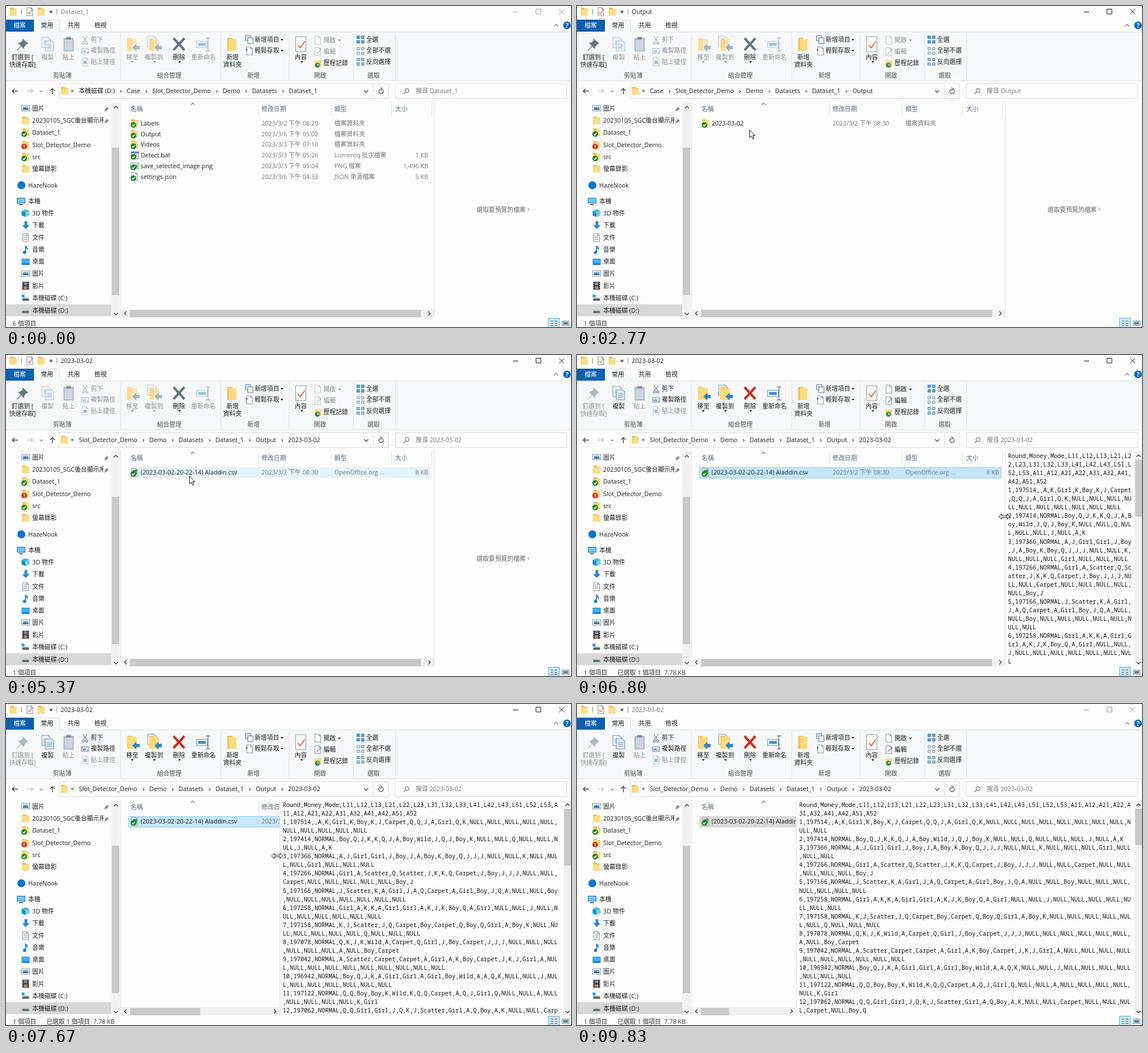
These frames come from a looping animation (993x564 px, 9910 ms). An HTML page with a canvas:

```html
<!DOCTYPE html>
<html lang="zh-Hant">
<head>
<meta charset="utf-8">
<style>
html, body { margin: 0; width: 100%; height: 100%; overflow: hidden; background: #fdfdfd; }
canvas { display: block; }
</style>
</head>
<body>
<canvas id="stage" width="993" height="564"></canvas>
<script>
const W = 993, H = 564, LOOP = 9910;
const options = { alpha: false, willReadFrequently: true };
const stage = document.getElementById('stage').getContext('2d', options);
let ctx = stage;
const UI = "10.8px 'Open Sans','Noto Sans CJK TC','Noto Sans CJK JP',sans-serif";
const MONO = "10.33px 'Noto Sans Mono','Liberation Mono',monospace";
const INK = '#1c1c1c', DIM = '#757575', FAINT = '#9b9b9b', THUMB = '#c9c9c9', TRACK = '#f1f1f1', RULE = '#e2e2e2';

// Motion: [time, ...values], linear between keys
const cursorKeys = [
  [500, 566, 566], [730, 456, 389], [1030, 456, 389], [1570, 297, 224], [2670, 297, 224],
  [2930, 314, 208], [3830, 314, 208], [3900, 314, 213], [4280, 314, 213], [4300, 324, 213],
  [4500, 324, 213], [4700, 322.5, 213], [5550, 322.5, 213], [6130, 743, 277], [6370, 743, 277],
  [6400, 746, 279], [6700, 746, 279], [6730, 751, 284], [7200, 752, 284], [7470, 564, 279],
  [7870, 390, 255], [8170, 385, 255], [8330, 385, 255], [8650, 302, 300], [9200, 736, 568]
];
const dividerKeys = [[7200, 752], [7470, 571.5], [7870, 391], [8170, 385]];

function track(keys, t) {
  if (t <= keys[0][0]) return keys[0].slice(1);
  for (let i = 1; i < keys.length; i++) {
    const a = keys[i - 1], b = keys[i];
    if (t < b[0]) return a.slice(1).map((v, j) => v + (b[j + 1] - v) * (t - a[0]) / (b[0] - a[0]));
  }
  return keys.at(-1).slice(1);
}

// Folder contents: [icon, name, date, type, size]
const DIR = '檔案資料夾';
const views = {
  dataset: {
    title: 'Dataset_1',
    path: ['本機磁碟 (D:)', 'Case', 'Slot_Detector_Demo', 'Demo', 'Datasets', 'Dataset_1'],
    rows: [
      ['folder', 'Labels', '2023/3/2 下午 08:20', DIR, ''],
      ['folder', 'Output', '2023/3/6 下午 05:02', DIR, ''],
      ['folder', 'Videos', '2023/3/3 下午 07:10', DIR, ''],
      ['batch', 'Detect.bat', '2023/3/3 下午 05:26', 'Lumeroq 批次檔案', '1 KB'],
      ['picture', 'save_selected_image.png', '2023/3/3 下午 05:04', 'PNG 檔案', '1,496 KB'],
      ['page', 'settings.json', '2023/3/6 下午 04:33', 'JSON 來源檔案', '5 KB']
    ]
  },
  output: {
    title: 'Output',
    path: ['Case', 'Slot_Detector_Demo', 'Demo', 'Datasets', 'Dataset_1', 'Output'],
    rows: [['folder', '2023-03-02', '2023/3/2 下午 08:30', DIR, '']]
  },
  day: {
    title: '2023-03-02',
    path: ['Slot_Detector_Demo', 'Demo', 'Datasets', 'Dataset_1', 'Output', '2023-03-02'],
    rows: [['sheet', '(2023-03-02-20-22-14) Aladdin.csv', '2023/3/2 下午 08:30', 'OpenOffice.org ...', '8 KB']]
  }
};

// Spreadsheet preview: one letter per cell
const words = { G: 'Girl', B: 'Boy', C: 'Carpet', S: 'Scatter', W: 'Wild', '.': 'NULL' };
const spins = `197514 AKGKBKJCQQJAGQK..........
197414 BQJKKQJABWJQJBK..Q...J.AK
197366 AJGGJBJABKBQJJJ..K...G...
197266 GASQSJKKQCJBJJJ..C.....BJ
197166 JSKAGJAQCAGBJQA..B.......
197258 GAKKAGGAKJKBQAG..J.......
197158 KJSJQCBCQBQGABK......Q...
197078 QKJKWACQGJBCJJJ......A.BC
197042 ASCCAGAKBCJKJGA..........
196942 BQJKAGGAGBWAAQK..J.......
197122 QQBBKWKQQCAQJGQ..A.....KG
197062 QQGGJQKJSGAQBAK..C...C.BQ`;
const grid = (letter, n) => [1, 2, 3, 4, 5].flatMap(i => [1, 2, 3].slice(0, n).map(j => letter + i + j));
const csv = [['Round', 'Money', 'Mode', ...grid('L', 3), ...grid('A', 2)].join()].concat(
  spins.split('\n').map((line, i) => {
    const [money, cells] = line.split(' ');
    return [i + 1, money, i ? 'NORMAL' : '', ...[...cells].map(c => words[c] || c)].join();
  }));

// Icons: colour and path pairs around the centre; "~" strokes
const sheetOutline = ['#fff', 'M-5-7H2L5-4V7H-5z', '~#8b9299', 'M-5-7H2L5-4V7H-5zM2-7V-4H5'];
const bigSheet = (x, y, c) => [c, `M${x} ${y}h11l4 4v14h-15z`, '~#7f95ab', `M${x} ${y}h11l4 4v14h-15zM${x + 3} ${y + 7}h9m-9 3h9m-9 3h9`];
const bigFolder = ['#f2c45a', 'M-9-11H-1V11H-9z', '#ffd978', 'M-8-9H8V12H-8z'];
const blueArrow = ['#2f86c8', 'M0 6L7-1V3H13V9H7V13z'];
const tiles = c => [c, 'M-7-7h6v6h-6zM1-7h6v6h-6zM-7 1h6v6h-6zM1 1h6v6h-6z', '~#4d83ad', 'M-6-6h4v4h-4zM2-6h4v4h-4zM-6 2h4v4h-4zM2 2h4v4h-4z'];
const icons = {
  folder: ['#efc04f', 'M-6-7H0L1-5H6V7H-6z', '#ffdd83', 'M-5-4H6V7H-5z'],
  page: sheetOutline,
  checkPage: [...sheetOutline, '~#d5502c', 'M-3 1L-1 4L4-3'],
  editPage: [...sheetOutline, '~#3f78a8', 'M-2 4L6-4'],
  history: ['#ffd978', 'M-6-5H6V6H-6z', '#3b8f4c', 'M-5 3a4.5 4.5 0 1 0 9 0a4.5 4.5 0 1 0-9 0', '~#fff', 'M0 0V3H3'],
  batch: ['#fff', 'M-6-6H7V6H-6z', '~#75828f', 'M-6-6H7V6H-6z', '#5287b5', 'M-6-6H7V-3H-6z', '#9aa4ad', 'M0-1h4v4h-4z'],
  picture: ['#fff', 'M-7-5H7V5H-7z', '~#8a98a5', 'M-7-5H7V5H-7z', '#79b8e4', 'M-5-3H5V3H-5z', '#436f82', 'M-5 3V1L-1-1L2 1L5 0V3z'],
  sheet: [...sheetOutline, '#2f9d3f', 'M-3-4H4V4H-3z'],
  circle: ['#0a74d1', 'M-7 0a7 7 0 1 0 14 0a7 7 0 1 0-14 0'],
  computer: ['#3d6f95', 'M-8-6H7V4H-8z', '#6cc6f2', 'M-7-5H6V3H-7z', '#54718a', 'M-4 5H3V7H-4z'],
  cube: ['#40bcd8', 'M-7-4L0-7L7-4L0-1z', '#1f8fb5', 'M-7-4L0-1V7L-7 4z', '#78d6e6', 'M0-1L7-4V4L0 7z'],
  download: ['#2f86d2', 'M-2-7H3V0H7L0 7L-6 0H-2z'],
  text: [...sheetOutline, '~#4c86b4', 'M-3-3H2M-3 0H3M-3 3H3'],
  music: ['#1b83d6', 'M-1-7H1C2-4 6-3 4 2C4-1 3-1 1-2V4A3 3 0 1 1-1 2z'],
  desktop: ['#1683d8', 'M-7-5H7V6H-7z', '#43b0f1', 'M-6-4H6V3H-6z'],
  film: ['#34373c', 'M-6-7H6V7H-6z', '#7a8fc0', 'M-3-6H3V-1H-3z', '#c38a62', 'M-3 1H3V6H-3z', '~#e8e8e8', 'M-5-5v1m0 3v1m0 3v1M5-5v1m0 3v1m0 3v1'],
  disk: ['#5f666c', 'M-6 1H6V5H-6z', '#c5cace', 'M-6 1L-4-1H4L6 1z', '#41b84d', 'M3 2h2v2h-2z'],
  systemDisk: ['#5f666c', 'M-6 1H6V5H-6z', '#c5cace', 'M-6 1L-4-1H4L6 1z', '#21a2e4', 'M-7-6h5v5h-5z'],
  pin: ['#697680', 'M0-10L10-1L6 1L3 5L3 9L-8-2L-4-3L0-6z', '~#697680', 'M-3 4L-10 11'],
  smallPin: ['#7b858d', 'M0-4L4 0L1 1L0 4L-4 0L-1-1z', '~#7b858d', 'M-1 1L-4 4'],
  copy: [...bigSheet(-10, -12, '#eaf4fc'), ...bigSheet(-4, -6, '#d8ebf9')],
  paste: ['#6d7f93', 'M-9-11H9V13H-9z', '#eaf2f9', 'M-7-8H7V11H-7z', '#49596a', 'M-4-13H4V-8H-4z'],
  cut: ['~#5b7087', 'M-4-7L3 3M4-7L-3 3M-5 5a2 2 0 1 0 4 0a2 2 0 1 0-4 0M1 5a2 2 0 1 0 4 0a2 2 0 1 0-4 0'],
  route: ['#eef4fa', 'M-6-4H6V4H-6z', '~#587da0', 'M-6-4H6V4H-6zM-4-1L-3 2L-1-1L0 2L2-1M3 2H5'],
  shortcut: [...sheetOutline, '#3f83bd', 'M-3-2H3V4H-3z'],
  move: [...bigFolder, ...blueArrow],
  copyTo: [...bigSheet(-12, -14, '#eef5fb'), ...bigFolder, ...blueArrow],
  cross: ['#d5291f', 'M-11-9L-8-12L0-3L8-12L11-9L3 0L11 9L8 12L0 3L-8 12L-11 9L-3 0z'],
  rename: ['#eaf4fc', 'M-12-5H7V6H-12z', '~#6d8fac', 'M-12-5H7V6H-12z', '#3f8fcd', 'M-9-2H4V3H-9z', '~#44576b', 'M4-11H12M8-11V12M4 12H12'],
  newFolder: ['#f0c055', 'M-8-11H1V12H-8z', '#ffdb7d', 'M-5-9H8V12H-5z'],
  newItem: ['#dcebf7', 'M-7-7H2V2H-7z', '~#557f9e', 'M-7-7H2V2H-7zM-3-3H6V7H-3z', '#fff', 'M-2-2H5V6H-2z'],
  easy: [...sheetOutline, '~#3474a5', 'M-7-2H-3M-5-4V0'],
  properties: ['#fff', 'M-9-13H9V13H-9z', '~#8a949c', 'M-9-13H9V13H-9z', '~#de5427', 'M-5 1L-1 6L7-5M-5 2L-1 7L7-4'],
  all: tiles('#59aee6'), none: tiles('#fff'), invert: tiles('#b7ddf5')
};
icons.greyCross = ['#66727d', icons.cross[1]];

function stroke(d, color, width = 1) {
  ctx.strokeStyle = color;
  ctx.lineWidth = width;
  ctx.stroke(new Path2D(d));
}
function rect(x, y, w, h, fill, border) {
  ctx.fillStyle = fill;
  ctx.fillRect(x, y, w, h);
  if (border) {
    ctx.strokeStyle = border;
    ctx.lineWidth = 1;
    ctx.strokeRect(x + .5, y + .5, w - 1, h - 1);
  }
}
function text(s, x, y, color = INK, align = 'left', font = UI) {
  ctx.font = font;
  ctx.fillStyle = color;
  ctx.textAlign = align;
  ctx.fillText(s, x, y + 4);
}
function icon(name, x, y, alpha = 1) {
  const parts = icons[name];
  ctx.save();
  ctx.translate(x, y);
  ctx.globalAlpha = alpha;
  for (let i = 0; i < parts.length; i += 2) {
    if (parts[i][0] === '~') stroke(parts[i + 1], parts[i].slice(1), 1.1);
    else {
      ctx.fillStyle = parts[i];
      ctx.fill(new Path2D(parts[i + 1]));
    }
  }
  ctx.restore();
}
function disc(x, y, r, color) {
  ctx.fillStyle = color;
  ctx.beginPath();
  ctx.arc(x, y, r, 0, 7);
  ctx.fill();
}
function badge(x, y, ok) {
  disc(x, y, 5, ok ? '#17861f' : '#cf3517');
  stroke(ok ? `M${x - 2.5} ${y}l2 2l3-4` : `M${x} ${y - 3}v4m0 1v1.3`, '#fff', 1.5);
}
const turns = { up: [-4, 2, 0, -2, 4, 2], down: [-4, -2, 0, 2, 4, -2], left: [2, -4, -2, 0, 2, 4], right: [-2, -4, 2, 0, -2, 4] };
function chevron(dir, x, y, color = '#444', width = 1.4, size = .9) {
  const p = turns[dir].map((v, i) => v * size + (i % 2 ? y : x));
  stroke(`M${p[0]} ${p[1]}L${p[2]} ${p[3]}L${p[4]} ${p[5]}`, color, width);
}
function menuMark(x, y, color = '#333') {
  ctx.fillStyle = color;
  ctx.fill(new Path2D(`M${x - 2.5} ${y - 1}h5l-2.5 3z`));
}
function clipped(x, y, w, h, draw) {
  ctx.save();
  ctx.beginPath();
  ctx.rect(x, y, w, h);
  ctx.clip();
  draw();
  ctx.restore();
}

function titleBar(title, focused) {
  const ink = focused ? '#111' : FAINT;
  icon('folder', 13, 10);
  icon('checkPage', 42, 10);
  icon('folder', 62, 10);
  stroke('M27.5 5V15M89.5 5V15', '#888');
  stroke('M76 9H82', '#333');
  menuMark(79, 11);
  text(title, 96, 10, focused ? INK : DIM);
  stroke('M891 10.5H900M931.5 5.5H940V14H931.5zM972 5.5L981 14.5M981 5.5L972 14.5', ink);
}

// [icon, x, y, label, label x, label y, enabled when, menu x, menu y]
const buttons = [
  ['pin', 29, 67, '釘選到 [', 29, 90, 'idle'], ['', 0, 0, '快速存取]', 29, 103, 'idle'],
  ['copy', 73, 67, '複製', 73, 90, 'picked'], ['paste', 110, 67, '貼上', 110, 90, 'never'],
  ['cut', 139, 60, '剪下', 149, 59, 'picked'], ['route', 139, 79, '複製路徑', 149, 78, 'picked'],
  ['shortcut', 139, 98, '貼上捷徑', 149, 98, 'never'],
  ['move', 222, 67, '移至', 222, 90, 'picked', 222, 98], ['copyTo', 261, 67, '複製到', 260, 90, 'picked', 261, 98],
  ['cross', 304, 67, '刪除', 304, 90, '', 305, 98], ['rename', 347, 67, '重新命名', 347, 90, 'picked'],
  ['newFolder', 397, 67, '新增', 398, 90, ''], ['', 0, 0, '資料夾', 398, 103, ''],
  ['newItem', 428, 59, '新增項目', 437, 59, '', 485, 59], ['easy', 428, 79, '輕鬆存取', 437, 78, '', 485, 78],
  ['properties', 518, 67, '內容', 518, 90, '', 520, 98],
  ['page', 548, 60, '開啟', 558, 60, 'picked', 586, 60], ['editPage', 548, 80, '編輯', 558, 80, 'picked'],
  ['history', 548, 101, '歷程記錄', 558, 100, ''],
  ['all', 623, 59, '全選', 633, 59, ''], ['none', 623, 79, '全部不選', 633, 78, ''], ['invert', 623, 98, '反向選擇', 633, 98, '']
];
function ribbon(picked) {
  rect(0, 46, W, 86, '#f7f8f9');
  stroke('M0 45.5H49.5V24.5H94.5V45.5H993M0 131.5H993', '#dfe1e3');
  rect(50, 25, 44, 22, '#f7f8f9');
  rect(0, 24, 49, 21, '#0a60b2');
  [['檔案', 24, '#fff'], ['常用', 72], ['共用', 119], ['檢視', 166]].forEach(([s, x, c]) => text(s, x, 34, c, 'center'));
  chevron('up', 967, 34, '#777', 1.2);
  disc(986, 34, 6.8, '#0a68bd');
  text('?', 986, 34, '#fff', 'center', 'bold ' + UI);
  stroke('M201.5 48V130M377.5 48V130M497.5 48V130M610.5 48V130M684.5 48V130', RULE);
  for (const [name, x, y, label, lx, ly, when, mx, my] of buttons) {
    const on = !when || when === (picked ? 'picked' : 'idle');
    const color = on ? INK : '#8a8f94';
    if (name) icon(name === 'cross' && !picked ? 'greyCross' : name, x, y, on ? 1 : .5);
    text(label, lx, ly, color, !name || y === 67 ? 'center' : 'left');
    if (mx) menuMark(mx, my, color);
  }
  [['剪貼簿', 99], ['組合管理', 287], ['新增', 435], ['開啟', 552], ['選取', 646]].forEach(([s, x]) => text(s, x, 122, '#4c4c4c', 'center'));
}

function addressBar({ title, path }) {
  stroke('M21 149.5H11M15 145.5L11 149.5L15 153.5M81.5 155V145M77.5 149L81.5 145L85.5 149', '#444', 1.4);
  stroke('M37 149.5H47M43 145.5L47 149.5L43 153.5', '#c9c9c9', 1.3);
  chevron('down', 62, 150, '#777', 1.2, .6);
  rect(93, 136, 580, 27, '#fdfdfd', '#dcdcdc');
  stroke('M645.5 137V162', '#dcdcdc');
  icon('folder', 103, 149);
  text('«', 114, 148);
  let x = 128;
  path.forEach((part, i) => {
    text(part, x, 149);
    x += ctx.measureText(part).width + 21;
    if (i < path.length - 1) chevron('right', x - 10.5, 150, '#555', 1.2, .6);
  });
  chevron('down', 633, 150, '#444', 1.4);
  stroke('M662.5 147.5A4 4 0 1 1 658 146M658 143.5L661.5 146L658 148.5', '#444', 1.2);
  rect(684, 136, 302, 27, '#fdfdfd', '#dcdcdc');
  stroke('M701.5 148.5a3.3 3.3 0 1 1 6.6 0a3.3 3.3 0 1 1-6.6 0M702.5 151L698.5 154.5', '#777', 1.2);
  text('搜尋 ' + title, 720, 149, DIM);
}

const places = [
  ['picture', '圖片', 179.5], ['folder', '20230105_SGC後台顯示用', 201], ['folder', 'Dataset_1', 222, true],
  ['folder', 'Slot_Detector_Demo', 244, false], ['folder', 'src', 265, true], ['folder', '螢幕錄影', 286],
  ['circle', 'HazeNook', 315], ['computer', '本機', 343], ['cube', '3D 物件', 364], ['download', '下載', 385],
  ['text', '文件', 407], ['music', '音樂', 428], ['desktop', '桌面', 449], ['picture', '圖片', 470],
  ['film', '影片', 491.5], ['systemDisk', '本機磁碟 (C:)', 513], ['disk', '本機磁碟 (D:)', 534.5]
];
function sidebar() {
  rect(0, 524, 185, 21, '#d8d8d8');
  clipped(0, 168, 171.5, 379, () => places.forEach(([name, label, y, mark]) => {
    const root = name === 'circle' || name === 'computer';
    icon(name, root ? 27 : 34.5, y);
    if (mark !== undefined) badge(32, y + 3, mark);
    text(label, root ? 39 : 46, y);
  }));
  icon('smallPin', 177, 181);
  icon('smallPin', 177, 202);
  rect(185, 170, 15, 377, TRACK);
  rect(186, 249, 13, 259, THUMB);
  chevron('up', 193, 178);
  chevron('down', 193, 541);
  stroke('M201.5 168V547', RULE);
}

function fileList(rows, right, picked, hovered, focused) {
  clipped(203, 166, right - 203, 382, () => {
    stroke('M443.5 169V193M571.5 169V193M677.5 169V193M748.5 169V193', RULE);
    chevron('up', 328, 172, '#666', 1.1, .8);
    [['名稱', 219], ['修改日期', 449], ['類型', 577], ['大小', 684]].forEach(([s, x]) => text(s, x, 181, '#56677c'));
    rows.forEach(([name, label, date, type, size], i) => {
      const y = 206 + i * 18.7, top = Math.round(y - 9.5);
      if (i === picked) rect(215, top, 531, 20, focused ? '#c6e5fa' : '#d9d9d9', focused && '#99cff2');
      else if (i === hovered) rect(215, top, 531, 19, '#e5f3fd');
      icon(name, 226, y);
      badge(224, y + 3, true);
      text(label, 236.5, y);
      text(date, 449, y, DIM);
      text(type, 577, y, DIM);
      text(size, 742, y, DIM, 'right');
    });
    rect(203, 533, right - 203, 14, TRACK);
    rect(218, 534, (right - 234) * (right - 203) / 556, 13, THUMB);
    chevron('left', 210, 540);
    chevron('right', right - 8, 540);
  });
  stroke(`M${Math.round(right) + .5} 168V547`, RULE);
}

function preview(left, torn, settled) {
  const x = left + 5.6, cols = Math.floor((976 - x) / 6.2);
  clipped(left + 1, 166, W - 1 - left, 380, () => {
    let y = 177;
    csv.forEach((line, row) => {
      for (let i = 0; i < line.length && y < 556; i += cols, y += 15.05) {
        if (!(torn && row === 1 && !i)) text(line.slice(i, i + cols), x, y, '#111', 'left', MONO);
      }
    });
  });
  rect(980, 170, 13, 377, TRACK);
  rect(981, 184, 12, settled ? 64 : 100, THUMB);
  chevron('up', 987, 177);
  chevron('down', 987, 541);
}

function statusBar(count, picked, size) {
  text(count + ' 個項目', 12, 558, '#333');
  if (picked) text('已選取 1 個項目  ' + size, 71, 558, '#333');
  rect(953, 548, 20, 18, '#cde8f8', '#52aede');
  stroke('M957 553.5H962M964 553.5H969M957 557.5H962M964 557.5H969M957 561.5H962M964 561.5H969', '#55636e');
  rect(977, 553, 13, 9, '#fff', '#7d858c');
  rect(979, 555, 9, 5, '#5d88a8');
}

const arrow = 'M0 0V13.5L3.2 10.6L5.4 15.8L7.6 14.9L5.4 9.8H9.6z';
const resizeArrow = 'M-10 0L-5-4.5V-1.5H5V-4.5L10 0L5 4.5V1.5H-5V4.5z';
function pointer(x, y, shape) {
  ctx.save();
  ctx.translate(x, y);
  ctx.fillStyle = '#fff';
  ctx.fill(new Path2D(shape));
  stroke(shape, '#111');
  ctx.restore();
}

// A layer repaints only when its key changes
function makeLayer() {
  const canvas = Object.assign(document.createElement('canvas'), { width: W, height: H });
  const own = canvas.getContext('2d', options);
  let last;
  return (key, paint) => {
    if (key !== last) {
      last = key;
      const outer = ctx;
      ctx = own;
      paint();
      ctx = outer;
    }
    return canvas;
  };
}
const chrome = makeLayer(), scene = makeLayer();
let shown;

function draw(t) {
  const viewName = t < 2100 ? 'dataset' : t < 3230 ? 'output' : 'day', view = views[viewName];
  const [x, y] = track(cursorKeys, t);
  const [divider] = track(dividerKeys, t);
  const fileOpen = t >= 5430, loaded = t >= 5700, settled = t >= 8170;
  const picked = t >= 1930 && t < 2100 ? 1 : t >= 3100 && t < 3230 || fileOpen ? 0 : -1;
  const active = fileOpen || t >= 1980 && t < 2100 || t >= 3140 && t < 3230;
  const focused = t >= 1930 && t < 9800 && !(t >= 4930 && t < 5170);
  const row = x > 215 && x < 746 ? Math.floor((y - 196.5) / 18.7) : -1;
  const hovered = t >= 500 && row < view.rows.length ? row : -1;
  const torn = t >= 7840 && t < 7900;
  const visible = t >= 500 && t < 9200, resizing = t >= 6730 && t < 8400;

  const chromeKey = [viewName, active, focused, fileOpen].join();
  const sceneKey = [chromeKey, divider, picked, hovered, loaded, torn, settled].join();
  const stageKey = [sceneKey, visible && [x, y, resizing]].join();
  if (stageKey === shown) return;
  shown = stageKey;

  stage.drawImage(scene(sceneKey, () => {
    ctx.drawImage(chrome(chromeKey, () => {
      rect(0, 0, W, H, '#fdfdfd');
      titleBar(view.title, focused);
      ribbon(active);
      addressBar(view);
      sidebar();
      statusBar(view.rows.length, active, fileOpen ? '7.78 KB' : '');
    }), 0, 0);
    fileList(view.rows, divider, picked, hovered, focused);
    if (loaded) preview(divider, torn, settled);
    else if (!active) text('選取要預覽的檔案。', 827, 358, '#6a6a6a');
  }), 0, 0);
  if (visible) pointer(x, y, resizing ? resizeArrow : arrow);
}

const start = performance.now();
function frame() {
  draw((performance.now() - start) % LOOP);
  requestAnimationFrame(frame);
}
frame();
</script>
</body>
</html>
```
